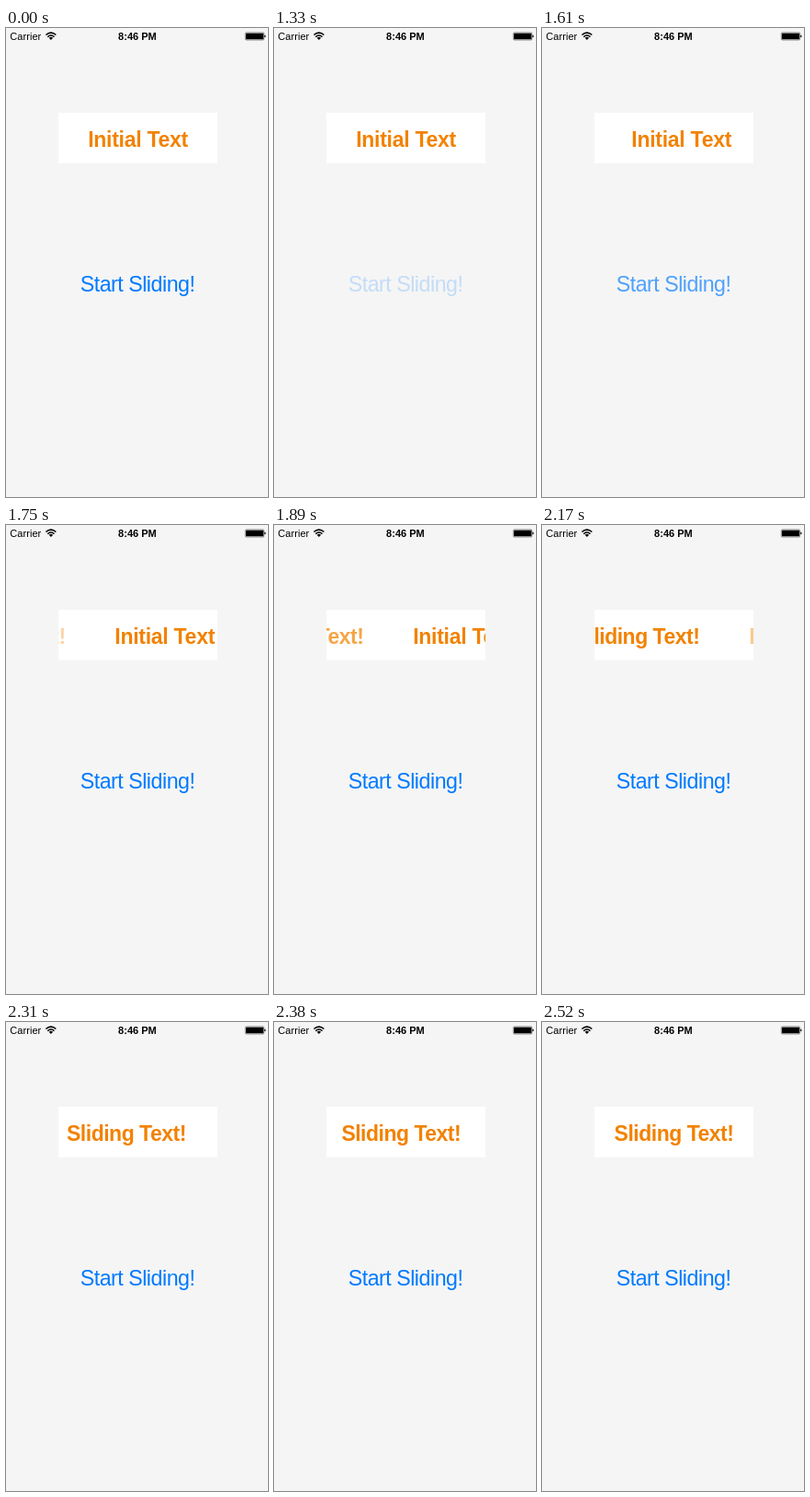
Write an HTML page that moves like this. It is 285 px wide and 509 px high and loops after 3990 ms.

```html
<!DOCTYPE html>
<html lang="en">
<head>
<meta charset="utf-8">
<title>Sliding label</title>
<style>
  html, body { margin: 0; width: 100%; height: 100%; overflow: hidden; background: #f5f5f5; }
  svg { display: block; font-family: "Liberation Sans", Arial, sans-serif; }
  .label { font-size: 23px; font-weight: bold; fill: #f28200; }
</style>
</head>
<body>
<svg width="285" height="509" viewBox="0 0 285 509">
  <clipPath id="window"><rect x="57" y="92" width="173" height="54.7"/></clipPath>

  <g font-size="11">
    <text x="4.2" y="13.2" letter-spacing=".08">Carrier</text>
    <text x="142.9" y="13.2" text-anchor="middle" font-weight="bold">8:46 PM</text>
  </g>
  <g fill="none" stroke="#000" stroke-width="1.5">
    <path d="M43.4 7.5Q48.9 2.7 54.4 7.5M45.3 9.6Q48.9 6.5 52.5 9.6"/>
    <path d="M46.7 10.7Q48.9 9 51.1 10.7L48.9 12.9Z" fill="#000" stroke="none"/>
  </g>
  <rect x="260.3" y="5" width="20.4" height="8" rx="1.2" fill="none" stroke="#000" stroke-width=".45"/>
  <rect x="261" y="5.7" width="19" height="6.6" rx=".6"/>
  <path d="M281.2 7.6Q282.6 8 282.6 9T281.2 10.4Z"/>

  <rect x="57" y="92" width="173" height="54.7" fill="#fff"/>
  <g class="label" clip-path="url(#window)">
    <text id="before" x="89.2" y="128.5" letter-spacing="-.28">Initial Text</text>
    <text id="after" x="78.6" y="128.5" letter-spacing="-.5">Sliding Text!</text>
  </g>
  <text id="button" x="80.7" y="285.7" font-size="23.2" letter-spacing="-.48" fill="#007aff">Start Sliding!</text>
</svg>
<script>
const LOOP = 3990, STEP = 70, PRESS = 1330;
const SLIDE_START = 1447, SLIDE_TIME = 1064, WIDTH = 173;
const [before, after, button] = ["before", "after", "button"].map(id => document.getElementById(id));
const clamp = v => Math.min(1, Math.max(0, v));

// Cubic Bézier (.42, 0, .58, 1), solved for x by bisection
function easeInOut(x) {
  let lo = 0, hi = 1;
  for (let i = 0; i < 24; i++) {
    const u = (lo + hi) / 2, v = 1 - u;
    if (3 * v * v * u * .42 + 3 * v * u * u * .58 + u ** 3 < x) lo = u; else hi = u;
  }
  return lo * lo * (3 - 2 * lo);
}

function place(el, x, opacity) {
  el.setAttribute("transform", `translate(${x} 0)`);
  el.setAttribute("opacity", clamp(opacity));
}

function draw(now) {
  const t = Math.floor(now % LOOP / STEP) * STEP;
  const x = clamp((t - SLIDE_START) / SLIDE_TIME);
  const p = x === 0 || x === 1 ? x : easeInOut(x);
  place(before, p * WIDTH, 2 * (1 - p));
  place(after, (p - 1) * WIDTH, 2 * p);
  place(button, 0, t < PRESS ? 1 : .2 + .8 * clamp((t - 1470) / 235));
  requestAnimationFrame(() => draw(performance.now() - start));
}

const start = performance.now();
draw(0);
</script>
</body>
</html>
```
